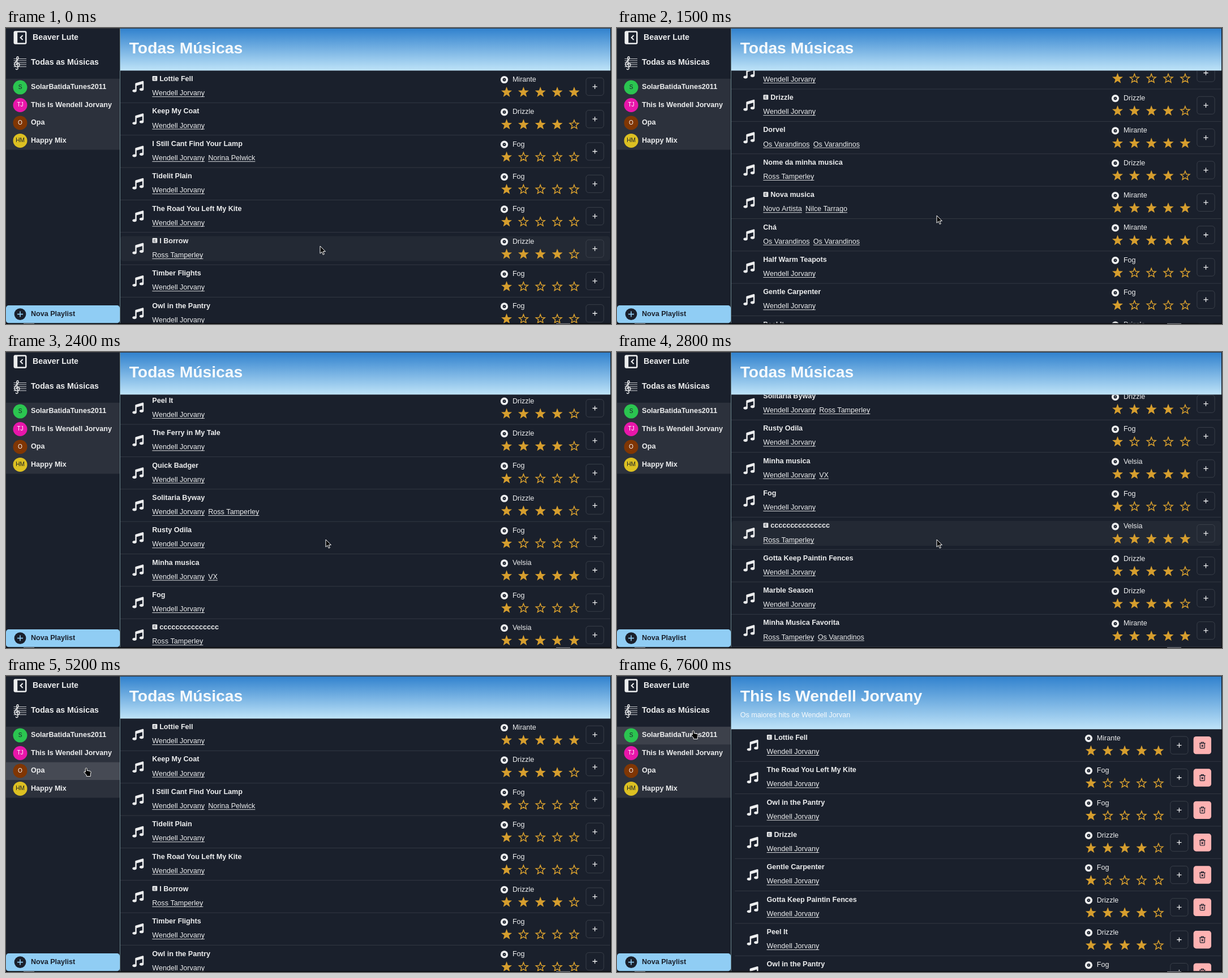
An HTML page with a canvas for the animation above (8 s loop, 1069 by 524 pixels).

```html
<!DOCTYPE html>
<html lang="pt">
<head>
<meta charset="utf-8">
<title>Beaver Lute</title>
<style>
  html, body { margin: 0; width: 100%; height: 100%; overflow: hidden; background: #1a202c; }
  canvas { display: block; }
</style>
</head>
<body>
<canvas id="stage" width="1069" height="524"></canvas>
<script>
const ctx = document.getElementById('stage').getContext('2d');
const LOOP = 8000, TICK = 100, FADE = 200;
const BG = '#1a202c', INK = '#edeeef', GOLD = '#d69e2e', SKY = '#90cdf4';
const BODY = 12.57, LARGE = 14.14, HEADING = 28.28;
const ROW = 57.35, SIDE_ROW = 31.43, SIDE_TOP = 89.8, LIST_TOP = 75.4, LINE = 18.85;

// Songs: title (* marks explicit), album, artists
const LEAD = 'Wendell Jorvany', ROSS = 'Ross Tamperley', BAND = 'Os Varandinos';
const RATING = { Fog: 1, Drizzle: 4, Mirante: 5, Velsia: 5 };
const songs = [
  ['*Lottie Fell', 'Mirante'],
  ['Keep My Coat', 'Drizzle'],
  ['I Still Cant Find Your Lamp', 'Fog', LEAD, 'Norina Pelwick'],
  ['Tidelit Plain', 'Fog'],
  ['The Road You Left My Kite', 'Fog'],
  ['*I Borrow', 'Drizzle', ROSS],
  ['Timber Flights', 'Fog'],
  ['Owl in the Pantry', 'Fog'],
  ['*Drizzle', 'Drizzle'],
  ['Dorvel', 'Mirante', BAND, BAND],
  ['Nome da minha musica', 'Drizzle', ROSS],
  ['*Nova musica', 'Mirante', 'Novo Artista', 'Nilce Tarrago'],
  ['Chá', 'Mirante', BAND, BAND],
  ['Half Warm Teapots', 'Fog'],
  ['Gentle Carpenter', 'Fog'],
  ['Peel It', 'Drizzle'],
  ['The Ferry in My Tale', 'Drizzle'],
  ['Quick Badger', 'Fog'],
  ['Solitaria Byway', 'Drizzle', LEAD, ROSS],
  ['Rusty Odila', 'Fog'],
  ['Minha musica', 'Velsia', LEAD, 'VX'],
  ['Fog', 'Fog'],
  ['*' + 'c'.repeat(15), 'Velsia', ROSS],
  ['Gotta Keep Paintin Fences', 'Drizzle'],
  ['Marble Season', 'Drizzle'],
  ['Minha Musica Favorita', 'Mirante', ROSS, BAND],
];
const hits = [0, 4, 7, 8, 14, 23, 15, 7].map(i => songs[i]);

// Times at which the pointer enters, presses, opens and leaves each playlist
const playlists = [
  { name: 'SolarBatidaTunes2011', tag: 'S', color: '#2bc550', ink: BG, enter: 7300 },
  { name: 'This Is ' + LEAD, tag: 'TJ', color: '#e816aa', ink: '#fff',
    enter: 5800, press: 6200, open: 6800, leave: 7200 },
  { name: 'Opa', tag: 'O', color: '#803604', ink: '#fff',
    enter: 4600, press: 5100, open: 5400, leave: 5800 },
  { name: 'Happy Mix', tag: 'HM', color: '#dcc022', ink: BG },
];
const [, mixList, emptyList] = playlists;

const wheel = [
  { start: 800, end: 1650, by: 464 },
  { start: 1720, end: 2800, by: 580.4 },
  { start: 3500, end: 4290, by: -1044.4 },
];
const moves = [
  { start: 100, end: 300, dx: 10, dy: -54 },
  { start: 4000, end: 4700, dx: -423, dy: -169 },
  { start: 5800, end: 6100, dx: 3, dy: -32 },
  { start: 7200, end: 7600, dx: -10, dy: -34 },
];

const clamp = u => Math.min(1, Math.max(0, u));
function eased(t, { start, end }) {
  const u = clamp((t - start) / (end - start));
  return u * u * (3 - 2 * u);
}
const total = (list, t, key) => list.reduce((sum, m) => sum + m[key] * eased(t, m), 0);
const scrollAt = t => total(wheel, t, 'by');
const pointerAt = t => ({ x: 555 + total(moves, t, 'dx'), y: 386 + total(moves, t, 'dy') });

// The row under the pointer keeps its highlight until a scroll comes to rest
function hoveredRow(t) {
  const gesture = wheel.find(g => t > g.start && t < g.end);
  const rest = gesture ? gesture.start : t;
  const { x, y } = pointerAt(rest);
  return x < 202 ? -1 : Math.floor((y - LIST_TOP + scrollAt(rest)) / ROW);
}
// 0 idle, 1 hovered, 2 pressed
function highlight({ enter, press, open, leave }, t) {
  const ramp = start => start ? clamp((t - start) / FADE) : 0;
  return ramp(enter) + ramp(press) - ramp(open) - ramp(leave);
}

function text(str, x, y, { size = BODY, bold = false, color = INK, align = 'left' } = {}) {
  ctx.font = `${bold ? 'bold ' : ''}${size}px "Liberation Sans", Arial, sans-serif`;
  ctx.fillStyle = color;
  ctx.textAlign = align;
  ctx.fillText(str, x, y);
  return ctx.measureText(str).width;
}
function rect(x, y, w, h, color) {
  ctx.fillStyle = color;
  ctx.fillRect(x, y, w, h);
}
function box(x, y, w, h, r, fill, stroke) {
  ctx.beginPath();
  ctx.roundRect(x, y, w, h, r);
  if (fill) { ctx.fillStyle = fill; ctx.fill(); }
  if (stroke) { ctx.strokeStyle = stroke; ctx.lineWidth = 0.9; ctx.stroke(); }
}
function disc(x, y, r, color) {
  ctx.beginPath();
  ctx.arc(x, y, r, 0, 7);
  ctx.fillStyle = color;
  ctx.fill();
}
function shape(path, x, y, { scale = 1, fill, stroke, width = 1 }) {
  ctx.save();
  ctx.translate(x, y);
  ctx.scale(scale, scale);
  if (fill) { ctx.fillStyle = fill; ctx.fill(path); }
  if (stroke) { ctx.strokeStyle = stroke; ctx.lineWidth = width; ctx.stroke(path); }
  ctx.restore();
}

function starPath(outer, inner) {
  const path = new Path2D();
  for (let i = 0; i < 10; i++) {
    const r = i % 2 ? inner : outer, a = i * Math.PI / 5;
    path.lineTo(r * Math.sin(a), -r * Math.cos(a));
  }
  path.closePath();
  return path;
}
const plus = r => new Path2D(`M${-r} 0H${r}M0 ${-r}V${r}`);
const fullStar = starPath(10, 4.2), emptyStar = starPath(8.3, 3.6);
const chevron = new Path2D('M2-4L-2 0L2 4');
const note = new Path2D('M23.5 0L7.5 4.8Q6.4 5.2 6.4 6.3V19.4Q5.6 19.2 4.8 19.2C2.1 19.2 0 20.6 0 22.4S2.1 25.6 4.8 25.6 9.6 24.2 9.6 22.4V10.7L22.4 7V16.2Q21.6 16 20.8 16C18.1 16 16 17.4 16 19.2S18.1 22.4 20.8 22.4 25.6 21 25.6 19.2V1.6Q25.4-.2 23.5 0Z');
const clef = new Path2D('M-2 10.5C-4 12 1.5 13.5 1 9L-1.2-7C-1.6-11 2-12.5 2-8.5C2-4-5-2.5-5 3C-5 8.5 4 8.5 4 3.5C4 0-2-.5-1.8 4');
const trash = new Path2D('M-5.3-3.6H5.3M-2-3.8V-5.4H2V-3.8M-4-3.4V4.2Q-4 5.3-3 5.3H3Q4 5.3 4 4.2V-3.4M-1.6-.8L1.6 2.6M1.6-.8L-1.6 2.6');
const arrow = new Path2D('M0 0V13.2L3.1 10.3 5.2 15.3 7.3 14.4 5.2 9.6H9.4Z');
const hand = new Path2D('M-1.7 1.2Q-1.7 0-.3 0T1.1 1.2V4.4L6 5.2Q8.2 5.6 8.1 7.6L7.3 11V14.5H.2V12.2L-3.9 8Q-4.6 6.4-3.2 6L-1.7 7.2Z');

function songRow([label, album, ...artists], top, { left, right, removable, hovered }) {
  const mid = top + 28.4;
  if (hovered) box(202, top + 6.3, 865, 44, 4.7, 'rgba(255,255,255,.04)');
  rect(left, top + 56.5, 1067.5 - left, 0.9, '#353a45');
  shape(note, left + 21.3, mid - 10, { scale: 0.78, fill: INK });

  let x = left + 56.3;
  const explicit = label[0] === '*';
  if (explicit) {
    box(x + 0.3, top + 9.7, 8.7, 8.7, 1.2, INK);
    text('E', x + 4.65, top + 16.5, { size: 6.8, color: BG, align: 'center' });
  }
  text(explicit ? label.slice(1) : label, explicit ? x + 12.9 : x, top + 18.7, { bold: true });
  for (const artist of artists.length ? artists : [LEAD]) {
    const width = text(artist, x, top + 43.8);
    rect(x, top + 45.8, width, 0.9, INK);
    x += width + 6.3;
  }

  for (const [r, color] of [[6.6, INK], [2.9, BG], [0.8, INK]]) disc(right - 160, top + 16.1, r, color);
  text(album, right - 145.6, top + 19.6);
  for (let i = 0; i < 5; i++) {
    const cx = right - 156 + i * 29.85, cy = top + 38.5;
    if (i < RATING[album]) shape(fullStar, cx, cy, { fill: GOLD });
    else shape(emptyStar, cx, cy, { stroke: GOLD, width: 1.5 });
  }
  box(right - 15.6, mid - 15.6, 31.2, 31.2, 4.7, null, '#3e434d');
  shape(plus(4.1), right, mid, { stroke: INK, width: 1.3 });
  if (removable) {
    box(1018.6, mid - 15.7, 31.4, 31.4, 4.7, '#feb2b2');
    shape(trash, 1034.3, mid, { stroke: BG, width: 1.2 });
  }
}

function page({ title, subtitle, rows = [], scroll = 0, hovered = -1, ...layout }) {
  const bottom = subtitle ? LIST_TOP + LINE : LIST_TOP;
  ctx.save();
  ctx.beginPath();
  ctx.rect(202, bottom, 866, 522.5 - bottom);
  ctx.clip();
  rows.forEach((song, i) => {
    const top = bottom + i * ROW - scroll;
    if (top > bottom - ROW && top < 524) songRow(song, top, { ...layout, hovered: i === hovered });
  });
  ctx.restore();

  const sky = ctx.createLinearGradient(0, 1, 0, bottom);
  sky.addColorStop(0, '#3182ce');
  sky.addColorStop(1, '#bee3f8');
  rect(202, 1, 866, bottom - 1, sky);
  text(title, 217.7, 45.4, { size: HEADING, bold: true, color: '#f7fafc' });
  if (subtitle) text(subtitle, 217.7, 72.7, { color: '#f7fafc' });
}

function sidebar(t) {
  box(13.5, 5.3, 23, 23.4, 3, INK);
  box(20.2, 7.8, 13.8, 18.4, 0.5, BG);
  shape(chevron, 27.6, 17, { stroke: INK, width: 2 });
  text('Beaver Lute', 47.1, 21.2, { size: LARGE, bold: true });

  for (let i = 0; i < 5; i++) rect(13.5, 54 + i * 3.5, 22.5, 0.8, INK);
  shape(clef, 20, 61.5, { stroke: INK, width: 1.4 });
  text('Todas as Músicas', 44, 65.1, { size: LARGE, bold: true });

  rect(0, SIDE_TOP, 201, SIDE_ROW * playlists.length, '#2c313c');
  playlists.forEach((list, i) => {
    const top = SIDE_TOP + i * SIDE_ROW, mid = top + 15.3;
    rect(0, top, 201, SIDE_ROW, `rgba(255,255,255,${0.08 * highlight(list, t)})`);
    disc(25, mid, 12.5, list.color);
    text(list.tag, 25, mid + 2.8, { size: 10.1, color: list.ink, align: 'center' });
    text(list.name, 44, mid + 3.2, { bold: true });
  });

  box(0, 491, 201, 31.4, 4.7, SKY);
  disc(25, 506.6, 10.4, BG);
  shape(plus(5), 25, 506.6, { stroke: SKY, width: 1.6 });
  text('Nova Playlist', 44, 509.9, { bold: true, color: BG });
  rect(201, 1, 1, 521.5, '#6b858c');
}

function windowEdges() {
  rect(0, 0, 1069, 1, '#33353a');
  rect(1068, 1, 1, 523, '#0b0d11');
  rect(0, 522.6, 1069, 1.4, '#08090c');
  rect(31, 522.8, 19, 1.2, '#77797d');
  rect(972, 522.8, 25, 1.2, '#77797d');
}

function draw(t) {
  rect(0, 0, 1069, 524, BG);
  sidebar(t);
  if (t < emptyList.open) {
    page({ title: 'Todas Músicas', rows: songs, scroll: scrollAt(t), hovered: hoveredRow(t),
      left: 202, right: 1040.5 });
  } else if (t < mixList.open) {
    page({ title: emptyList.name, subtitle: 'Aoba' });
  } else {
    page({ title: mixList.name, subtitle: 'Os maiores hits de Wendell Jorvan', rows: hits,
      left: 208.3, right: 993.4, removable: true });
  }
  windowEdges();

  const { x, y } = pointerAt(t);
  shape(x < 201 ? hand : arrow, x, y, { fill: '#000', stroke: '#fff' });
}

function frame(now) {
  draw(Math.floor(now % LOOP / TICK) * TICK);
  requestAnimationFrame(frame);
}
draw(0);
requestAnimationFrame(frame);
</script>
</body>
</html>
```
